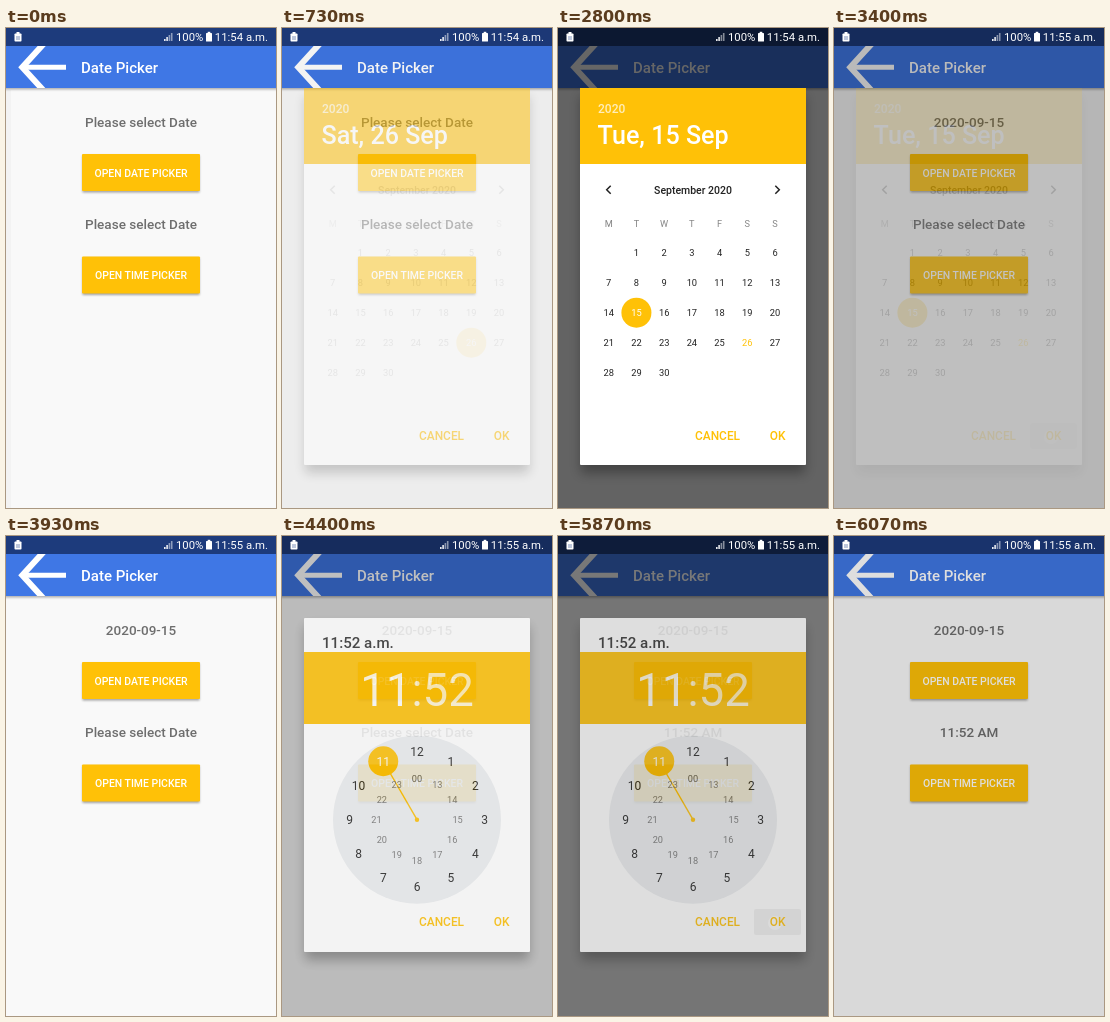
These frames come from a looping animation (270x480 px, 6140 ms). An HTML page:

```html
<!DOCTYPE html>
<html lang="en">
<head>
<meta charset="utf-8">
<title>Date and time picker</title>
<style>
  html, body { margin: 0; width: 100%; height: 100%; overflow: hidden; background: #fafafa; }
  svg { display: block; width: 100%; height: 100%; }
  text { font-family: Roboto, "Open Sans", sans-serif; }
</style>
</head>
<body>
<svg id="stage" viewBox="0 0 270 480">
  <defs>
    <filter id="soft" x="-30%" y="-30%" width="160%" height="160%"><feGaussianBlur stdDeviation="6"/></filter>
    <filter id="thin" x="-20%" y="-50%" width="140%" height="200%"><feGaussianBlur stdDeviation="1.2"/></filter>
    <clipPath id="bar"><rect y="18" width="270" height="42"/></clipPath>
  </defs>
  <g id="page"></g>
  <rect id="scrim" width="270" height="480"/>
  <g id="status"></g>
  <g id="dateDialog"></g>
  <g id="timeDialog"></g>
</svg>
<script>
const LOOP = 6140;
const STEP = 200 / 3;
const YELLOW = '#ffc107';
const INK = '#222';
const $ = id => document.getElementById(id);

function add(parent, tag, attrs) {
  const el = document.createElementNS('http://www.w3.org/2000/svg', tag);
  for (const key in attrs) el.setAttribute(key, attrs[key]);
  parent.appendChild(el);
  return el;
}

const rect = (parent, x, y, width, height, fill, more) =>
  add(parent, 'rect', { x, y, width, height, fill, ...more });

const circle = (parent, cx, cy, r, fill) => add(parent, 'circle', { cx, cy, r, fill });

const line = (parent, d, stroke, width) =>
  add(parent, 'path', { d, fill: 'none', stroke, 'stroke-width': width });

// Places text by the middle of its capitals.
function label(parent, str, x, cy, size, fill, weight = 400, anchor = 'middle') {
  const el = add(parent, 'text', {
    x, y: cy + size * 0.355, fill,
    'font-size': size, 'font-weight': weight, 'text-anchor': anchor
  });
  el.textContent = str;
  return el;
}

function setText(el, str) {
  if (el.textContent !== str) el.textContent = str;
}

const show = (el, opacity) => el.setAttribute('opacity', opacity);

function buildPage() {
  const page = $('page');
  rect(page, 0, 0, 270, 480, '#f9f9f9');
  const edge = rect(page, 0, 62, 5, 418, '#f3f3f3');
  rect(page, -5, 57, 280, 4.5, '#000', { opacity: 0.3, filter: 'url(#thin)' });
  rect(page, 0, 18, 270, 42, '#3f77e5');
  rect(page, 0, 0, 270, 18, '#1d3b7c');
  const arrow = add(page, 'g', { 'clip-path': 'url(#bar)' });
  line(arrow, 'M38 15.5L16.3 39.2L38 63', '#fff', 6);
  line(arrow, 'M16 39.2H60', '#fff', 5);
  label(page, 'Date Picker', 75, 40, 15, '#fff', 500, 'start');

  const button = (y, str) => {
    rect(page, 76.5, y + 1.5, 117, 37, '#000', { opacity: 0.35, filter: 'url(#thin)' });
    rect(page, 76, y, 118, 37, YELLOW, { rx: 1 });
    label(page, str, 135, y + 19, 10.45, '#fff', 500);
  };
  button(126, 'OPEN DATE PICKER');
  button(228.5, 'OPEN TIME PICKER');
  const value = cy => label(page, '', 135, cy, 13.5, '#6e6e6e', 500);
  return { edge, date: value(94), time: value(196.5) };
}

function buildStatus() {
  const bar = $('status');
  rect(bar, 8.5, 5.5, 7, 8, '#fff', { rx: 0.8 });
  rect(bar, 10.5, 4, 3, 2, '#fff');
  line(bar, 'M10 9H14M10 11H14', '#5b74a8', 0.8);
  for (let i = 0; i < 4; i++) {
    const h = 2 + i * 2;
    rect(bar, 158 + i * 2.3, 13 - h, 1.6, h, '#fff', { opacity: i < 2 ? 0.9 : 0.5 });
  }
  label(bar, '100%', 170, 9.3, 11.3, '#fff', 400, 'start');
  rect(bar, 200, 5, 6, 8.5, '#fff', { rx: 0.6 });
  rect(bar, 201.7, 3.8, 2.6, 2, '#fff');
  return label(bar, '', 262, 9.3, 11.35, '#fff', 400, 'end');
}

function buildPanel(dialog, top, bottom) {
  const h = bottom - top;
  rect(dialog, 23, top + 8, 224, h, '#000', { opacity: 0.32, filter: 'url(#soft)' });
  rect(dialog, 22, top, 226, h, '#fff', { rx: 1 });
}

// Action row; returns the press highlight on OK.
function buildActions(dialog, cy) {
  const press = add(dialog, 'g', {});
  rect(press, 196, cy - 13, 47, 26, '#000', { opacity: 0.06, rx: 2 });
  label(dialog, 'CANCEL', 137, cy, 11.9, YELLOW, 500, 'start');
  label(dialog, 'OK', 211.7, cy, 11.9, YELLOW, 500, 'start');
  const dot = circle(press, 217, cy + 1, 7, '#fff');
  dot.setAttribute('opacity', 0.75);
  return press;
}

function buildDateDialog() {
  const dialog = $('dateDialog');
  buildPanel(dialog, 60, 437);
  rect(dialog, 22, 60, 226, 76, YELLOW);
  label(dialog, '2020', 40, 81, 12, 'rgba(255,255,255,.72)', 500, 'start');
  const title = label(dialog, '', 39.5, 107, 25.1, '#fff', 500, 'start');

  const month = add(dialog, 'g', {});
  label(month, 'September 2020', 135, 162, 10.5, INK, 500);
  line(month, 'M52.7 157.7L48.7 161.7L52.7 165.7', INK, 1.5);
  line(month, 'M217.3 157.7L221.3 161.7L217.3 165.7', INK, 1.5);
  const colX = i => 50.7 + i * 27.72;
  [...'MTWTFSS'].forEach((d, i) => label(month, d, colX(i), 196, 9.2, '#858585'));
  const mark = circle(month, 0, 0, 15, YELLOW);
  const days = [];
  for (let d = 1; d <= 30; d++) {
    const x = colX(d % 7), y = 224.7 + Math.floor(d / 7) * 30;
    days[d] = { x, y, el: label(month, d, x, y, 9.3, INK) };
  }
  const press = buildActions(dialog, 408);

  function pick(day) {
    setText(title, day === 26 ? 'Sat, 26 Sep' : 'Tue, 15 Sep');
    mark.setAttribute('cx', days[day].x);
    mark.setAttribute('cy', days[day].y);
    for (const d of [15, 26]) {
      days[d].el.setAttribute('fill', d === day ? '#fff' : d === 26 ? YELLOW : INK);
    }
  }
  return { dialog, month, press, pick };
}

function buildTimeDialog() {
  const dialog = $('timeDialog');
  buildPanel(dialog, 82, 416);
  label(dialog, '11:52 a.m.', 40, 107, 15.1, '#333', 500, 'start');
  rect(dialog, 22, 116, 226, 72, YELLOW);
  const big = label(dialog, '11', 135, 153.5, 45.6, '#fff');
  const rest = add(big, 'tspan', { 'fill-opacity': 0.82 });
  rest.textContent = ':52';

  const cx = 135, cy = 283.7;
  const spot = (i, r) => {
    const a = i * Math.PI / 6;
    return [cx + r * Math.sin(a), cy - r * Math.cos(a)];
  };
  circle(dialog, cx, cy, 84, '#eceef0');
  const [hx, hy] = spot(11, 67.5);
  line(dialog, `M${cx} ${cy}L${hx} ${hy}`, YELLOW, 1.4);
  circle(dialog, cx, cy, 2.2, YELLOW);
  circle(dialog, hx, hy, 15, YELLOW);
  for (let i = 0; i < 12; i++) {
    label(dialog, i || 12, ...spot(i, 67.5), 12, i === 11 ? '#fff' : INK);
    label(dialog, i ? i + 12 : '00', ...spot(i, 40.6), 9.2, i ? '#757575' : '#555');
  }
  return { dialog, press: buildActions(dialog, 386) };
}

const page = buildPage();
const clock = buildStatus();
const dates = buildDateDialog();
const times = buildTimeDialog();

const ramp = (t, start, length) => Math.min(1, Math.max(0, (t - start) / length));
const easeOut = x => 1 - (1 - x) ** 3;
const within = (t, a, b) => t >= a && t < b ? 1 : 0;

function draw(t) {
  const dateIn = easeOut(ramp(t, 682, 220));
  const dateAlpha = dateIn * (1 - ramp(t, 3235, 190));
  const timeAlpha = easeOut(ramp(t, 4319, 180)) * (1 - ramp(t, 5825, 190));
  const dateDim = easeOut(ramp(t, 719, 410)) * (1 - ramp(t, 3235, 300));
  const timeDim = easeOut(ramp(t, 4335, 395)) * (1 - ramp(t, 5835, 300));

  show($('scrim'), 0.6 * Math.max(dateDim, timeDim));
  show(dates.dialog, dateAlpha);
  show(dates.month, dateIn ** 3);
  show(times.dialog, timeAlpha);
  show(dates.press, within(t, 3100, 3500));
  show(times.press, within(t, 5700, 6100));
  show(page.edge, within(t, 0, 720));

  dates.pick(t < 2190 ? 26 : 15);
  setText(clock, t < 3100 ? '11:54 a.m.' : '11:55 a.m.');
  setText(page.date, t < 3220 ? 'Please select Date' : '2020-09-15');
  setText(page.time, t < 5810 ? 'Please select Date' : '11:52 AM');
}

// The screen refreshes fifteen times a second.
function tick() {
  const t = performance.now() % LOOP;
  draw(Math.round(Math.floor(t / STEP + 0.051) * STEP / 10) * 10);
  requestAnimationFrame(tick);
}
tick();
</script>
</body>
</html>
```
